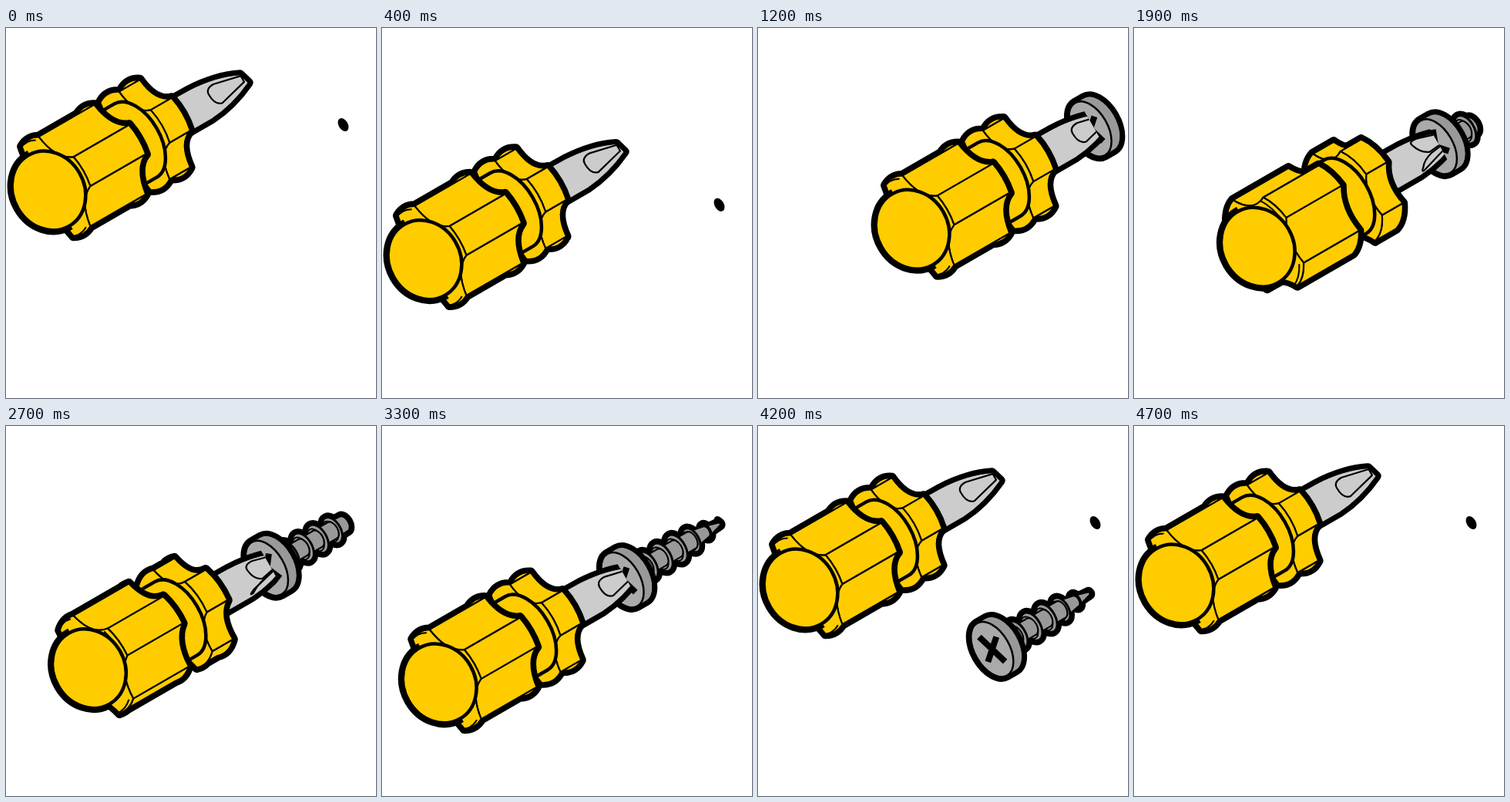
These frames come from a looping animation (480x480 px, 4.8 s). An HTML page:

```html
<!DOCTYPE html>
<html lang="en">
<head>
<meta charset="utf-8">
<title>Screwdriver</title>
<style>
html, body { margin: 0; width: 100%; height: 100%; overflow: hidden; background: #fff; }
svg { display: block; width: 100vw; height: 100vh; }
</style>
</head>
<body>
<svg id="stage" viewBox="0 0 480 480" stroke-linejoin="round"></svg>
<script>
const LOOP = 4800, STEP = 100;
const K = 0.577;              // foreshortening of circles around the tool axis
const AX = 0.866, AY = -0.5;  // axis direction on screen
const YELLOW = '#fc0', STEEL = '#ccc', FACE = '#aaa', RIM = '#999';
const stage = document.getElementById('stage');

const clamp = v => Math.max(0, Math.min(1, v));
const linear = (t, from, to) => clamp((t - from) / (to - from));
const ease = (t, from, to) => { const x = linear(t, from, to); return x * x * (3 - 2 * x); };

// Local frame: x runs along the axis, y across it.
const pt = (c, r, deg) => {
  const q = deg * Math.PI / 180;
  return (c + K * r * Math.sin(q)).toFixed(2) + ' ' + (r * Math.cos(q)).toFixed(2);
};
const path = (d, fill, width) =>
  `<path d="${d}" fill="${fill}" stroke="#000" stroke-width="${width}"/>`;
const ring = (c, r, fill, width) =>
  `<ellipse cx="${c}" rx="${K * r}" ry="${r}" fill="${fill}" stroke="#000" stroke-width="${width}"/>`;
const onAxis = (x, y, body) =>
  `<g transform="matrix(${AX} ${AY} ${-AY} ${AX} ${x} ${y})">${body}</g>`;

const tube = (c0, c1, r) => `M${c0} ${-r}H${c1}A${K * r} ${r} 0 0 1 ${c1} ${r}H${c0}A${K * r} ${r} 0 0 1 ${c0} ${-r}Z`;

// Prism with four lobes and hollow flutes between them.
function fluted(c0, c1, r, half, rot, bevel) {
  const edges = [];
  for (let i = 0; i < 4; i++) {
    const mid = 90 * i + rot;
    edges.push({ a: mid - half, b: mid + half, mid, bend: r / Math.cos(half * Math.PI / 180) });
    edges.push({ a: mid + half, b: mid + 90 - half, mid: mid + 45, bend: 43 });
  }
  const front = 'M' + pt(c0, r, edges[0].a) +
    edges.map(e => `Q${pt(c0, e.bend, e.mid)} ${pt(c0, r, e.b)}`).join('') + 'Z';
  const sides = edges
    .sort((p, q) => Math.sin(p.mid * Math.PI / 180) - Math.sin(q.mid * Math.PI / 180))
    .map(e => `M${pt(c0, r, e.a)}Q${pt(c0, e.bend, e.mid)} ${pt(c0, r, e.b)}` +
      `L${pt(c1, r, e.b)}Q${pt(c1, e.bend, e.mid)} ${pt(c1, r, e.a)}Z`);
  let out = path(sides.join('') + front, '#000', 13);
  out += sides.map(d => path(d, YELLOW, 2.2)).join('') + path(front, YELLOW, 2.2);
  if (bevel) {
    out += edges.filter(e => e.bend > r).map(e =>
      path(`M${pt(c0 - 5, r - 2, e.a)}Q${pt(c0 - 5, e.bend - 2, e.mid)} ${pt(c0 - 5, r - 2, e.b)}`, 'none', 2)).join('');
  }
  return out;
}

function blade(rot) {
  const shaft = 'M160 -23L222 -22Q262 -20 290 -6L294 8Q262 23 230 25L160 25Z';
  let out = path(shaft, '#000', 13) + path(shaft, STEEL, 1);
  for (let i = 0; i < 4; i++) {
    const q = 90 * i + rot;
    if (Math.sin(q * Math.PI / 180) < 0.1) continue;
    out += path(`M${pt(287, 7, q + 40)}L${pt(245, 20, q + 40)}Q${pt(231, 23, q + 34)} ${pt(229, 23, q + 10)}` +
      `Q${pt(230, 24, q - 30)} ${pt(243, 21, q - 42)}L${pt(287, 7, q - 40)}Z`, STEEL, 2.2);
  }
  return out;
}

function driver(rot, limit) {
  return `<clipPath id="bite"><rect x="100" y="-60" width="${limit - 100}" height="120"/></clipPath>` +
    `<g clip-path="url(#bite)">${blade(rot)}</g>` +
    fluted(129, 160, 70, 20.5, rot) +
    path(tube(98, 130, 55), YELLOW, 4.5) +
    fluted(11, 94, 70.5, 18, rot, true) +
    `<ellipse rx="46" ry="53" fill="#000" stroke="#000" stroke-width="12"/>`.replace('<ellipse', '<ellipse clip-path="url(#outer)"') +
    `<ellipse rx="46" ry="53" fill="${YELLOW}" stroke="#000" stroke-width="4.5"/>`;
}

const coreRadius = s => Math.min(12, 2 + (145 - s) * 0.29);
const threadRadius = s => Math.min(20, 4 + (145 - s) * 0.31);

function shank(end, rot) {
  if (end <= 14) return '';
  const phase = 22 * (rot / 360 - 1);
  const core = (a, b) =>
    `M${a} ${-coreRadius(a)}L${b} ${-coreRadius(b)}A${K * coreRadius(b)} ${coreRadius(b)} 0 0 1 ${b} ${coreRadius(b)}L${a} ${coreRadius(a)}Z`;
  let under = path(core(10, end), '#000', 13), over = '', far = end;
  for (let i = 5; i >= -1; i--) {
    const s = 37 + 22 * i + phase;
    if (s > Math.min(end, 132) || s < 16) continue;
    const r = threadRadius(s);
    under += ring(s, r, '#000', 12);
    over += path(core(s, far), RIM, 2.2) + ring(s, r, RIM, 3) + ring(s - 3, r * 0.78, FACE, 2);
    far = s;
  }
  return under + over + path(core(10, far), RIM, 2.2);
}

function screw(out, rot) {
  const slot = [27, 117].map(q =>
    `M${pt(0, 25, q + rot)}L${pt(0, 25, q + rot + 180)}`).join('');
  return shank(Math.min(145, 8.4 + out), rot) +
    path(tube(0, 13, 39), '#000', 13) + path(tube(0, 13, 39), RIM, 1) +
    ring(0, 39, FACE, 2.5) + path(slot, 'none', 8);
}

const hole = y => onAxis(437.5, y, '<ellipse rx="6" ry="9.3"/>');

function draw(t) {
  const TRAVEL = 167.4, PULL = 137.4, SCROLL = 335;
  const turn = linear(t, 1300, 3100);
  const out = PULL * turn, rot = 360 * turn;

  // Tool: down, in along the axis, out with the screw, back up.
  const down = t < 3500 ? ease(t + 100, 0, 800) : t < 4700 ? 1 - ease(t, 3500, 4300) : 0;
  const along = TRAVEL * ease(t, 700, 1200) - out - (TRAVEL - PULL) * ease(t, 3200, 3500);
  const aligned = t >= 700 && t <= 3500;
  const limit = aligned ? Math.min(400, 437 - out - along) : 400;

  const scroll = SCROLL * ease(t, 100, 910);
  const fall = Math.max(0, (t - 3700) / 1000) ** 2;
  const sx = 431 - AX * out - 33 * fall;
  const sy = 131 - AY * out + scroll - SCROLL + 360 * fall;

  let scene = '';
  if (t < 1000) scene += hole(125.5 + scroll);
  if (t >= 3100) scene += hole(125.5);
  if (t < 4700) scene += onAxis(sx, sy, screw(out, rot));
  scene += onAxis(55.5 + AX * along, 205 + 140 * down + AY * along, driver(rot + 90, limit));

  stage.innerHTML =
    '<clipPath id="window"><rect y="36" width="480" height="438"/></clipPath>' +
    '<clipPath id="outer"><rect x="-70" y="-70" width="72" height="140"/></clipPath>' +
    `<g clip-path="url(#window)">${scene}</g>`;
}

let shown = -1;
const start = performance.now();
function tick() {
  const t = Math.floor(((performance.now() - start) % LOOP) / STEP) * STEP;
  if (t !== shown) draw(shown = t);
  requestAnimationFrame(tick);
}
draw(shown = 0);
requestAnimationFrame(tick);
</script>
</body>
</html>
```
